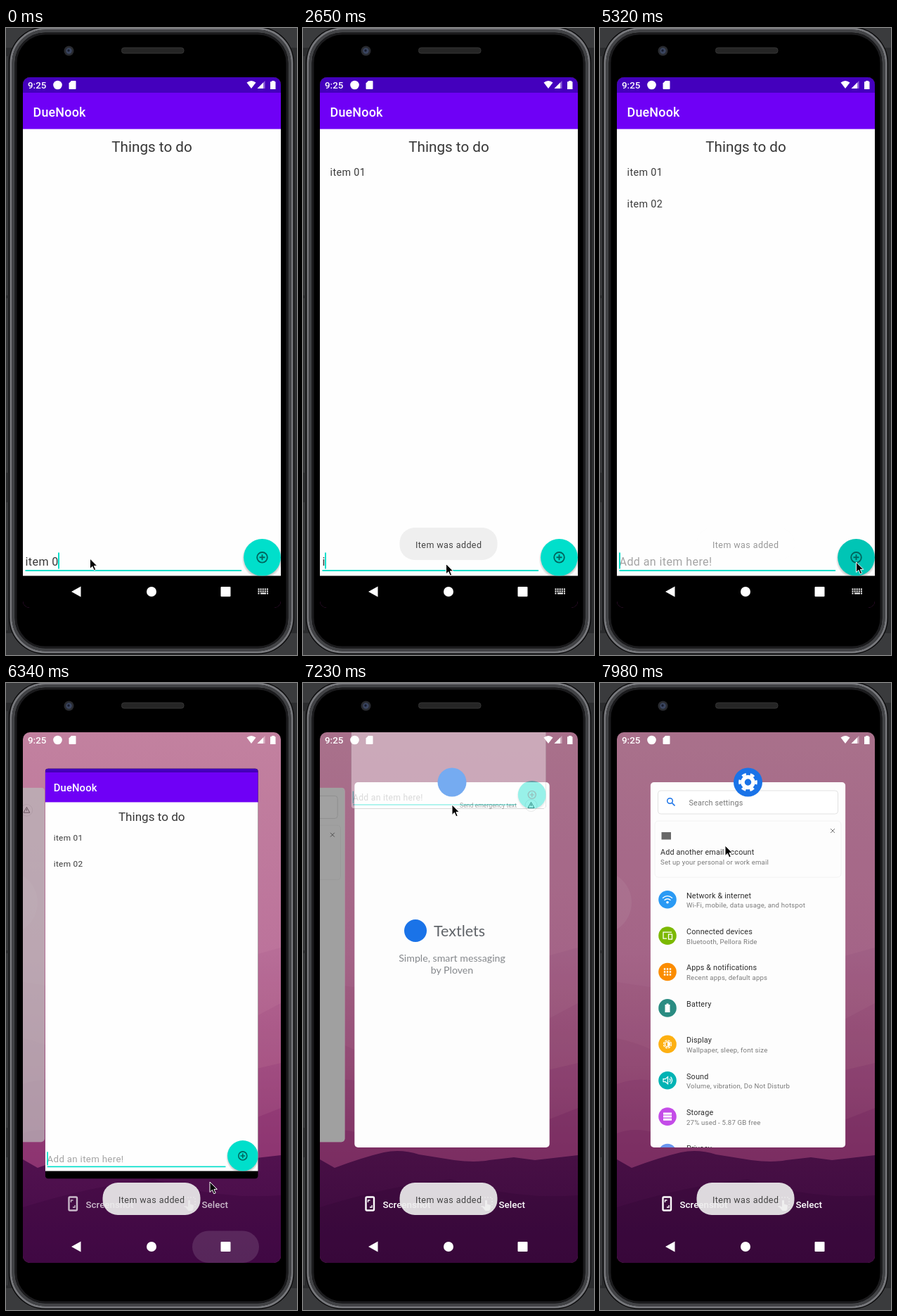
Recreate the animation shown at these times as an HTML page. Size 414 by 891 pixels, loop 8 s.

```html
<!DOCTYPE html>
<html lang="en">
<head>
<meta charset="utf-8">
<title>To-do list demo</title>
<style>
html, body { margin: 0; width: 100%; height: 100%; overflow: hidden; background: #2b2c2e; }
svg { display: block; width: 414px; height: 891px; font-family: Roboto, "Noto Sans", sans-serif; }
text { white-space: pre; }
.mid { text-anchor: middle; }
.body { font-size: 14.3px; letter-spacing: .4px; fill: #3a3a3a; }
.field { font-size: 16.07px; letter-spacing: .4px; fill: #383838; }
.hint { fill: #a4a4a4; }
.head { font-size: 10.8px; letter-spacing: .17px; fill: #2c2c2c; }
.sub { font-size: 9.6px; letter-spacing: .2px; fill: #7a7a7a; }
.splash { font-family: Lato, "Open Sans", sans-serif; fill: #5f6368; }
.white { fill: #fff; }
.line { fill: none; stroke: #fff; stroke-width: 1.3; }
.rim { fill: none; }
</style>
</head>
<body>
<svg viewBox="0 0 414 891">
  <defs>
    <linearGradient id="sky" x1="0" y1="70" x2="0" y2="700" gradientUnits="userSpaceOnUse">
      <stop offset="0" stop-color="#c2819f"/>
      <stop offset=".5" stop-color="#bc739b"/>
      <stop offset=".75" stop-color="#b0608c"/>
      <stop offset="1" stop-color="#964277"/>
    </linearGradient>
    <linearGradient id="ground" x1="0" y1="665" x2="0" y2="824" gradientUnits="userSpaceOnUse">
      <stop offset="0" stop-color="#52124f"/>
      <stop offset="1" stop-color="#440a48"/>
    </linearGradient>
    <radialGradient id="shade">
      <stop offset=".8" stop-opacity=".3"/>
      <stop offset="1" stop-opacity="0"/>
    </radialGradient>
    <clipPath id="screen"><rect x="24" y="70" width="367" height="754" rx="10"/></clipPath>
    <clipPath id="crop"><rect id="cropBox" x="24" width="367"/></clipPath>
    <clipPath id="cardClip"><rect x="-138.7" y="141" width="277.4" height="519" rx="5"/></clipPath>
  </defs>

  <!-- desktop and phone body -->
  <rect width="414" height="891" fill="#2b2c2e"/>
  <path d="M0 0H414V28H0ZM0 860H414V891H0Z" fill="#3a3b3d"/>
  <path d="M1.500 40V380M1.500 384V632M1.500 674V856" stroke="#47484a"/>
  <rect x="4" y="-2" width="406" height="892" rx="52" fill="#0b0b0c"/>
  <rect class="rim" x="7" y="1" width="400" height="886" rx="49" stroke="#77787c" stroke-width="3"/>
  <rect class="rim" x="10.500" y="4.500" width="393" height="879" rx="45.500" stroke="#424346" stroke-width="4"/>
  <rect x="14" y="8" width="386" height="872" rx="42" stroke="#1b1b1d" stroke-width="3"/>
  <circle cx="89.500" cy="32.500" r="7" fill="#292b30"/>
  <circle cx="89.500" cy="32.500" r="4.200" fill="#3a4560"/>
  <circle cx="89" cy="32" r="1.700" fill="#171c2b"/>
  <rect x="164.500" y="28" width="88.500" height="8" rx="3.500" fill="#252525" stroke="#353535"/>

  <g clip-path="url(#screen)">
    <!-- wallpaper -->
    <g id="wall">
      <rect x="24" y="70" width="367" height="754" fill="url(#sky)"/>
      <circle cx="0" cy="312" r="45" fill="#fff" opacity=".07"/>
      <g fill="#862a6c" opacity=".9">
        <path opacity=".08" d="M24 425L70 432Q220 445 340 390L391 376V700H24Z"/>
        <path opacity=".14" d="M24 505Q60 512 90 530Q230 560 340 482L391 455V700H24Z"/>
        <path opacity=".24" d="M24 570Q60 556 100 572Q240 600 340 552L391 540V700H24Z"/>
        <path opacity=".45" d="M24 640Q50 630 80 640Q240 655 345 622L391 604V700H24Z"/>
      </g>
      <path fill="url(#ground)" d="M24 677L45 689Q85 674 115 667Q140 662 165 670L215 678Q245 682 265 678L300 674L330 678L391 671V824H24Z"/>
      <path fill="#360638" opacity=".3" d="M24 745Q120 715 210 705Q300 735 391 728V824H24Z"/>
      <rect id="dim" x="24" y="70" width="367" height="754"/>
      <g id="actions" class="white" font-size="13.400" font-weight="500">
        <rect x="89.500" y="730.500" width="11.500" height="19" rx="1.500" fill="none" stroke="#fff" stroke-width="2.400"/>
        <path class="line" d="M92.500 738V735H95.500M98 742V745H95"/>
        <text x="113.500" y="745.500">Screenshot</text>
        <rect x="254" y="731" width="15" height="14" fill="none" stroke="#fff" stroke-dasharray="2 2"/>
        <path d="M259 735.500q1.500-1.500 3 0v5l5 1.500-.5 6-2 2h-5l-5-6 1-1 3.500 1.500Z"/>
        <text x="278.500" y="745.500">Select</text>
      </g>
    </g>

    <!-- settings card -->
    <g id="setup">
      <g clip-path="url(#cardClip)">
        <rect x="-139" y="141" width="278" height="520" fill="#fdfdfd"/>
        <rect x="-128" y="153" width="256" height="33" rx="4" fill="#fff" stroke="#e2e2e2"/>
        <circle cx="-111" cy="167.500" r="3.800" fill="none" stroke="#1a73e8" stroke-width="1.500"/>
        <path d="M-108 170.500l4 4" stroke="#1a73e8" stroke-width="1.700"/>
        <text class="head" x="-84" y="173.500" style="fill:#777">Search settings</text>
        <rect x="-132.500" y="196" width="265" height="80" rx="5" fill="none" stroke="#f2f2f2"/>
        <rect x="-123" y="212" width="13.500" height="10.500" fill="#686868"/>
        <path d="M117.500 207l6 6m0-6l-6 6" stroke="#777"/>
        <text class="head" x="-124.500" y="243.500">Add another email account</text>
        <text class="sub" x="-124.500" y="257.500">Set up your personal or work email</text>
        <g id="rows"></g>
        <rect class="scrim" x="-139" y="141" width="278" height="520"/>
      </g>
      <g class="icon">
        <circle cy="141" r="20.500" fill="#1a73e8"/>
        <circle cy="141" r="7.500" fill="none" stroke="#fff" stroke-width="5.500"/>
        <circle cy="141" r="11.600" fill="none" stroke="#fff" stroke-width="3.400" stroke-dasharray="6.070" stroke-dashoffset="3"/>
      </g>
    </g>

    <!-- chat card -->
    <g id="chat">
      <g clip-path="url(#cardClip)">
        <rect x="-139" y="141" width="278" height="520" fill="#fdfdfd"/>
        <circle cx="-52" cy="352" r="16" fill="#1a73e8"/>
        <text class="splash" x="-26" y="360" font-size="21.500">Textlets</text>
        <g class="splash mid" font-size="14.200" style="fill:#85888c">
          <text y="395.500">Simple, smart messaging</text>
          <text y="413">by Ploven</text>
        </g>
        <circle cx="112.500" cy="174" r="8.500" fill="#fff" stroke="#ddd" stroke-width=".7"/>
        <path d="M112.500 169.500l4.500 8h-9ZM112.500 172v3" fill="none" stroke="#555"/>
        <text x="92" y="177" font-size="8.700" text-anchor="end" fill="#666">Send emergency text</text>
        <rect class="scrim" x="-139" y="141" width="278" height="520"/>
      </g>
      <circle class="icon" cy="141" r="20.500" fill="#1a73e8"/>
    </g>

    <!-- to-do app -->
    <g id="todo">
      <g clip-path="url(#crop)">
        <rect x="24" y="70" width="367" height="754"/>
        <rect x="24" y="70" width="367" height="22" fill="#4400bd"/>
        <rect x="24" y="92" width="367" height="53" fill="#6f00f6"/>
        <rect x="24" y="143.600" width="367" height="634.900" fill="#fefefe"/>
        <text class="white" x="38.500" y="125.500" font-size="17.900" font-weight="500" letter-spacing=".2">DueNook</text>
        <text class="mid" x="207.500" y="175.500" font-size="20.700" fill="#363636">Things to do</text>
        <text class="body" id="item1" x="38.500" y="209.500">item 01</text>
        <text class="body" id="item2" x="38.500" y="254.500">item 02</text>
        <rect x="27.500" y="770" width="307.500" height="2" fill="#00dfcb"/>
        <text class="field" id="field" x="27.500" y="763.500"></text>
        <rect id="caret" y="745.500" width="2" height="23" fill="#00dfcb"/>
        <svg x="24" y="700" width="367" height="78.500" viewBox="24 700 367 78.500">
          <circle cx="364.500" cy="754.500" r="29" fill="url(#shade)"/>
          <circle id="fab" cx="364.500" cy="752.300" r="26.400"/>
          <g fill="none" stroke="#00665e" stroke-width="1.900">
            <circle cx="364.500" cy="752.300" r="7.300"/>
            <path d="M360.500 752.300h8M364.500 748.300v8"/>
          </g>
        </svg>
      </g>
      <circle class="icon" cx="207.500" cy="92" r="27" fill="#3ddc84"/>
    </g>

    <!-- system bars -->
    <g class="white">
      <text x="31" y="86" font-size="13.400" font-weight="500">9:25</text>
      <circle cx="73.500" cy="81" r="6.300"/>
      <path d="M93 75h5.500q1 0 1 1v10q0 1-1 1h-8q-1 0-1-1v-7.500Z"/>
      <path d="M342.500 77.500q6.500-5 13 0l-6.500 8.500Z"/>
      <path d="M368.500 75v11h-11Z" opacity=".4"/>
      <path d="M366 77.500v8.500h-8.500Z"/>
      <path d="M378 75h4v1.200h1.500v10.800h-7.500v-10.800h2Z"/>
      <rect id="tap" x="265" y="778.500" width="95" height="45.500" rx="23" opacity=".12"/>
      <path d="M106.500 793.500v15l-13.500-7.500Z"/>
      <circle cx="207" cy="801" r="7"/>
      <rect x="305.500" y="794" width="14" height="14" rx="1"/>
      <g id="keys" stroke="#fff" fill="none">
        <path d="M358.500 797.500h14.500M358.500 800.500h14.500" stroke-width="2" stroke-dasharray="2 1.100"/>
        <path d="M358.500 803.500h2M362 803.500h8M371 803.500h2" stroke-width="2"/>
      </g>
    </g>
    <g id="toast">
      <rect id="pill" x="137.500" y="710" width="139" height="46" rx="21.500" fill="#eee" fill-opacity=".91"/>
      <text x="160" y="738.500" font-size="12.500" letter-spacing=".42" fill="#444">Item was added</text>
    </g>
  </g>
  <path id="mouse" d="M0 0V14.500L3.400 11.300L5.800 16.800L8.200 15.800L5.900 10.400H10.300Z" stroke="#fff"/>
</svg>

<script>
const LOOP = 8000, TICK = 147.7, LEAD = 12;
const $ = id => document.getElementById(id);
const part = (id, cls) => $(id).querySelector('.' + cls);
const set = (el, attrs) => { for (const k in attrs) el.setAttribute(k, attrs[k]); };
const fade = (el, v) => el.setAttribute('opacity', v);

// Settings rows: colour, title, summary, glyph drawn around 0,0
const rows = [
  ['#2a9af4', 'Network &amp; internet', 'Wi-Fi, mobile, data usage, and hotspot',
    '<path class="line" d="M-7-2q7-6 14 0M-4.500 1q4.500-4 9 0"/><circle class="white" cy="4" r="1.800"/>'],
  ['#7cb900', 'Connected devices', 'Bluetooth, Pellora Ride',
    '<path class="line" d="M6-5H-6V4H-1"/><rect class="line" x="1.500" y="-2" width="5" height="7"/>'],
  ['#fb8c00', 'Apps &amp; notifications', 'Recent apps, default apps',
    '<path class="line" stroke-dasharray="2.400 1.600" style="stroke-width:2.400" d="M-5.200-4H5.200M-5.200 0H5.200M-5.200 4H5.200"/>'],
  ['#2a8c82', 'Battery', '', '<path class="white" d="M-1.500-6.500h3v1.500h2v11h-7v-11h2Z"/>'],
  ['#fdb012', 'Display', 'Wallpaper, sleep, font size',
    '<circle class="line" r="5.500" stroke-dasharray="3 1.300"/><path class="white" d="M0-3.500a3.500 3.500 0 0 1 0 7Z"/><circle class="line" r="3.500"/>'],
  ['#00b3b4', 'Sound', 'Volume, vibration, Do Not Disturb',
    '<path class="line" d="M-6-2h3l3.500-3v10l-3.500-3h-3ZM3-2.500q2 2.500 0 5M4.500-5q4 5 0 10"/>'],
  ['#c44ce8', 'Storage', '27% used - 5.87 GB free',
    '<path class="line" style="stroke-width:3" d="M-6-4.200H6M-6 0H6M-6 4.200H6"/>'],
  ['#6a96f0', 'Privacy', '', '']
];
$('rows').innerHTML = rows.map(([color, title, sub, glyph], i) =>
  `<g transform="translate(-114.5 ${307.7 + 51.4 * i})"><circle r="12.800" fill="${color}"/>${glyph}
  <text class="head" x="27" y="-2.200">${title}</text><text class="sub" x="27" y="11.800">${sub}</text></g>`).join('');

// Piecewise linear tracks, keyed by tick
const tracks = {
  mouseX: [[2, 119.5], [7, 364.5], [10, 364.5], [15, 203.5], [29, 203.5], [34, 364.5], [37, 364.5], [41, 312],
    [42, 312], [43, 290], [45, 228], [47, 213], [49, 212], [51, 195], [54, 178]],
  mouseY: [[2, 754], [7, 759], [10, 759], [15, 761.5], [29, 761.5], [34, 759], [37, 759], [41, 797], [42, 797],
    [43, 709], [45, 330], [47, 260], [49, 173], [51, 310], [54, 231]],
  toast: [[8, 0], [9, .5], [10, 1], [32, 1], [33, .3], [34, 0], [35, 0], [36, .55], [37, 1]],
  shrink: [[41, 0], [42, .3], [43, .715], [44, .94], [45, 1]],
  slide1: [[47, 0], [49, 1]],
  slide2: [[52, 0], [54, 1]],
  bounce: [[48, 0], [49, 4.7], [50, 0], [53, 0], [54, 3.2]],
  throw1: [[47, 0], [48, -200], [49, -481], [50, -900]],
  alpha1: [[47, 1], [48, .75], [49, .4], [50, 0]],
  throw2: [[51, 0], [52, -50], [53, -330], [54, -900]],
  alpha2: [[52, 1], [53, .55], [54, 0]],
  chatIcon: [[48, 0], [49, 1]],
  setupIcon: [[53, 0], [54, 1]]
};
const typed = [[0, 'item 0'], [1, 'item 01'], [9, ''], [18, 'i'], [19, 'it'], [20, 'ite'], [21, 'item'],
  [23, 'item '], [26, 'item 0'], [27, 'item 02'], [36, '']];

function at(name, n) {
  const keys = tracks[name], i = keys.findIndex(k => k[0] > n);
  if (i === 0) return keys[0][1];
  if (i < 0) return keys[keys.length - 1][1];
  const [a, u] = keys[i - 1], [b, v] = keys[i];
  return u + (v - u) * (n - a) / (b - a);
}

function drawField(n) {
  const [, value] = typed.filter(k => k[0] <= n).pop(), field = $('field');
  field.textContent = value || 'Add an item here!';
  field.classList.toggle('hint', !value);
  const since = n - (n < 36 ? 9 : 36);
  $('caret').setAttribute('x', Math.floor(27.5 + (value ? field.getComputedTextLength() : 0)));
  fade($('caret'), !value && since >= 3 && since < 6 ? 0 : 1);
}

function drawTodo(n, p) {
  const s = 1 - .244 * p, y = 144 + 36 * p - 144 * s + at('throw1', n);
  set($('todo'), {
    transform: `translate(${207.5 * (1 - s) - .4 * p} ${y}) scale(${s})`,
    opacity: at('alpha1', n)
  });
  set($('cropBox'), { y: 70 + 22 * p, height: 754 - 67.5 * p, rx: 7 * p });
  fade(part('todo', 'icon'), p < 1 ? 0 : 1);
  fade($('item1'), n >= 9 ? 1 : 0);
  fade($('item2'), n >= 36 ? 1 : 0);
  const pressed = [8, 9, 35, 36].includes(n);
  $('fab').setAttribute('fill', pressed ? '#00c5b5' : '#00dfcb');
}

// gap: distance from the centre slot, in cards
function drawCard(id, gap, n, p, lift, alpha) {
  const side = Math.min(gap, 1), s = 1 - .03 * side, x = 207.3 - 287 * gap + at('bounce', n);
  set($(id), {
    transform: `translate(${x} ${400.5 * (1 - s) + lift}) scale(${s})`,
    opacity: alpha * p
  });
  fade(part(id, 'scrim'), .37 * side * p);
  fade(part(id, 'icon'), at(id + 'Icon', n));
}

// The pill behind the text fades in later than the text itself
function drawToast(v) {
  fade($('toast'), v);
  fade($('pill'), v ** 4);
}

function draw(n) {
  const p = at('shrink', n), s1 = at('slide1', n), s2 = at('slide2', n);
  drawField(n);
  drawTodo(n, p);
  drawCard('chat', 1 - s1, n, p, at('throw2', n), at('alpha2', n));
  drawCard('setup', 2 - s1 - s2, n, p, 0, 1);
  drawToast(at('toast', n));
  fade($('dim'), .13 * Math.max(0, (p - .72) / .28));
  fade($('actions'), p);
  fade($('tap'), n >= 41 && n <= 43 ? .12 : 0);
  fade($('keys'), p ? 0 : 1);
  $('mouse').setAttribute('transform', `translate(${at('mouseX', n)} ${at('mouseY', n)})`);
}

const start = performance.now();
let last = -1;
function loop() {
  const t = (performance.now() - start) % LOOP;
  const n = Math.min(54, Math.floor((t + LEAD) / TICK));
  if (n !== last) draw(last = n);
  requestAnimationFrame(loop);
}
loop();
</script>
</body>
</html>
```
